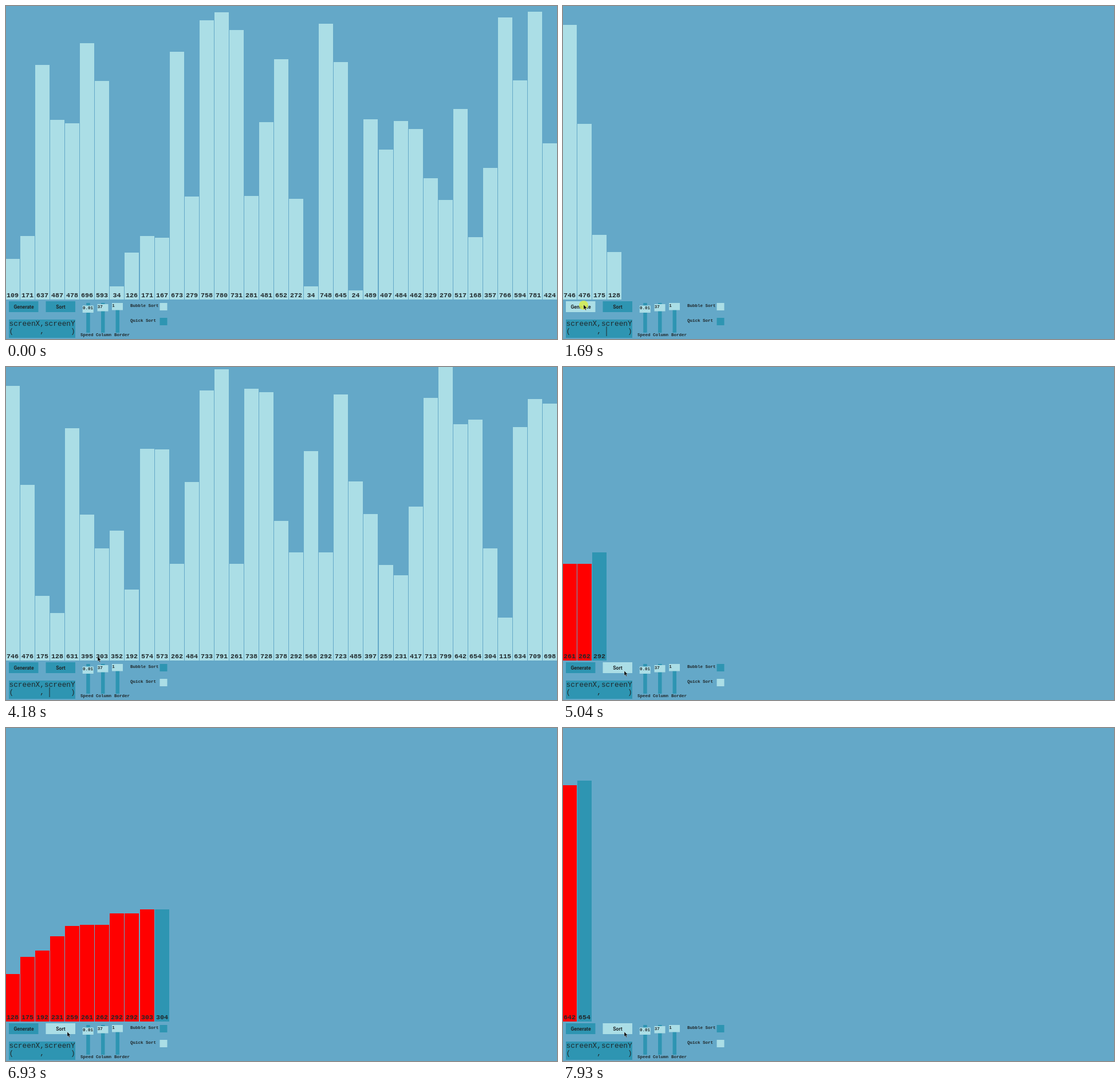
These frames come from a looping animation (962 px wide and 582 px high, 8000 ms). An HTML page with a canvas:

```html
<!DOCTYPE html>
<html lang="en">
<head>
<meta charset="utf-8">
<title>Sorting visualizer</title>
<style>
html, body { margin: 0; width: 100%; height: 100%; overflow: hidden; background: #64a8c8; }
canvas { display: block; }
</style>
</head>
<body>
<canvas id="stage" width="962" height="582"></canvas>
<script>
const ctx = document.getElementById('stage').getContext('2d');
const LOOP = 8000, FLOOR = 513;
const BG = '#64a8c8', LIGHT = '#abdee6', DARK = '#2e95b2', RED = '#ff0000', INK = '#20282b';
const MONO = '"Liberation Mono", monospace';
const SMALL = 'bold 7.5px ' + MONO;

// Clicks that start each stage, in ms.
const REFILL = 908, REFILL_AGAIN = 1640, PICK_QUICK = 3520, SORT = 4756;
const CLICKS = [REFILL, REFILL_AGAIN, PICK_QUICK, SORT];
const FILL_TIME = 15.25, BAR_TIME = 26, PART_GAP = 9;

// The labels readable on the opening bars and on the bars that get sorted.
const opening = [109, 171, 637, 487, 478, 696, 593, 34, 126, 171, 167, 673, 279, 758, 780, 731, 281, 481, 652,
  272, 34, 748, 645, 24, 489, 407, 484, 462, 329, 270, 517, 168, 357, 766, 594, 781, 424];
const unsorted = [746, 476, 175, 128, 631, 395, 303, 352, 192, 574, 573, 262, 484, 733, 791, 261, 738, 728, 378,
  292, 568, 292, 723, 485, 397, 259, 231, 417, 713, 799, 642, 654, 304, 115, 634, 709, 698];

let seed = 11;
const random = () => (seed = (seed * 16807) % 2147483647) / 2147483647;
const shuffled = opening.map(() => Math.round(12 + random() * 759));

// Quick sort with the last item as pivot; every merged part is shown bar by bar.
const parts = [];
function quickSort(list) {
  if (list.length < 2) return list;
  const rest = list.slice(0, -1), pivot = list[list.length - 1];
  const low = quickSort(rest.filter(v => v <= pivot));
  const high = quickSort(rest.filter(v => v > pivot));
  const merged = [...low, pivot, ...high];
  parts.push(merged);
  return merged;
}
quickSort(unsorted);

// Stops of the mouse: time, x, y.
const STOPS = [[130, 142, 560], [800, 36, 522], [2205, 36, 522], [2860, 228, 534],
  [PICK_QUICK, 273, 550], [4000, 190, 492], [4500, 107, 531], [LOOP, 107, 531]];

function pointerAt(t) {
  const i = STOPS.findIndex(stop => stop[0] > t);
  if (i < 1) return null;
  const [t0, x0, y0] = STOPS[i - 1], [t1, x1, y1] = STOPS[i];
  const k = (t - t0) / (t1 - t0);
  return [x0 + (x1 - x0) * k, y0 + (y1 - y0) * k];
}

function box(x, y, w, h, color) {
  ctx.fillStyle = color;
  ctx.fillRect(x, y, w, h);
}

function text(str, x, y, font, align = 'left') {
  ctx.font = font;
  ctx.textAlign = align;
  ctx.fillStyle = INK;
  ctx.fillText(str, x, y);
}

function bars(values, count, colorOf = () => LIGHT) {
  values.slice(0, count).forEach((v, i) => {
    const x = Math.round(26.06 * i - 1), y = Math.round(512.1 - 0.6426 * v);
    box(x, y, 25, FLOOR - y, colorOf(i));
    text(v, x + 12.5, 509, 'bold 11.7px ' + MONO, 'center');
  });
}

function drawSort(elapsed) {
  for (const part of parts) {
    const span = part.length * BAR_TIME + PART_GAP;
    if (elapsed < span) {
      const count = Math.min(part.length, Math.floor(elapsed / BAR_TIME) + 1);
      bars(part, count, i => i && i === count - 1 ? DARK : RED);
      return;
    }
    elapsed -= span;
  }
}

function drawBars(t) {
  const filled = start => Math.floor((t - start) / FILL_TIME) + 1;
  if (t >= SORT) drawSort(t - SORT);
  else if (t >= REFILL_AGAIN) bars(unsorted, filled(REFILL_AGAIN));
  else if (t >= REFILL) bars(shuffled, filled(REFILL));
  else bars(opening, opening.length);
}

function button(label, x, pointer) {
  const hover = pointer && Math.abs(pointer[0] - x - 26) < 26 && Math.abs(pointer[1] - 525.5) < 9.5;
  box(x, 516, 51.5, 19, hover ? LIGHT : DARK);
  text(label, x + 26, 529, 'bold 8.6px Roboto, sans-serif', 'center');
}

function slider(x, y, value, label, labelX) {
  box(x + 6.5, 519, 6.5, 52, DARK);
  box(x, y, 19, 12.5, LIGHT);
  text(value, x + 0.3, y + 6.7, SMALL);
  text(label, labelX, 577, SMALL);
}

function option(label, y, checked) {
  text(label, 217, y + 6.7, SMALL);
  box(268.5, y, 13, 13, checked ? LIGHT : DARK);
}

function drawPanel(t, pointer) {
  button('Generate', 5, pointer);
  button('Sort', 69.5, pointer);
  box(5, 548, 116, 32, DARK);
  text('screenX,screenY', 5.5, 559, '12.8px ' + MONO);
  text('(      ,      )', 5.5, 572, '12.8px ' + MONO);
  const caretOn = t < SORT && (t + 700) % 900 < 600;
  if (caretOn) box(75.5, 560, 1, 17, INK);
  slider(133.7, 523.5, '0.01', 'Speed', 130);
  slider(159.5, 521, '37', 'Column', 157);
  slider(185, 519, '1', 'Border', 189);
  option('Bubble Sort', 519, t < PICK_QUICK);
  option('Quick Sort', 545, t >= PICK_QUICK);
}

function drawPointer(t, [x, y]) {
  if (CLICKS.some(click => t > click - 30 && t < click + 90)) {
    ctx.fillStyle = 'rgba(214, 236, 78, 0.88)';
    ctx.beginPath();
    ctx.arc(x, y + 1, 8, 0, 2 * Math.PI);
    ctx.fill();
  }
  ctx.save();
  ctx.translate(x, y);
  const arrow = new Path2D('M0 0V8.3L1.9 6.6L3.3 9.8L4.6 9.2L3.2 6.2L5.6 6Z');
  ctx.fillStyle = '#000';
  ctx.fill(arrow);
  ctx.lineWidth = 0.5;
  ctx.strokeStyle = 'rgba(255, 255, 255, 0.7)';
  ctx.stroke(arrow);
  ctx.restore();
}

function draw(t) {
  const pointer = pointerAt(t);
  box(0, 0, 962, 582, BG);
  drawBars(t);
  drawPanel(t, pointer);
  if (pointer) drawPointer(t, pointer);
}

let start = null;
function loop(now) {
  if (start === null) start = now;
  draw(Math.max(0, now - start) % LOOP);
  requestAnimationFrame(loop);
}
draw(0);
requestAnimationFrame(loop);
</script>
</body>
</html>
```
